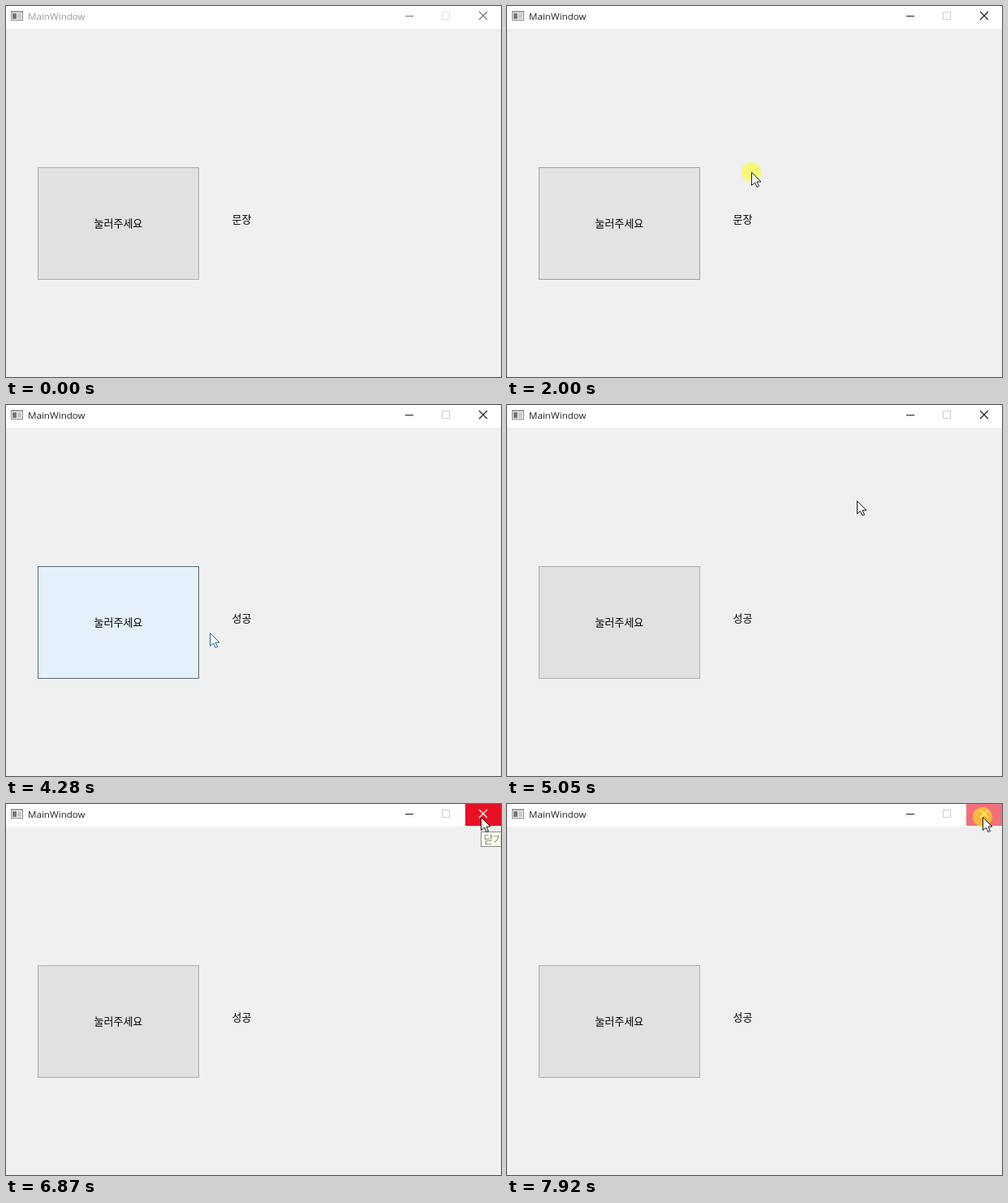
An HTML page with a canvas that plays this animation: 610x458 px, repeating every 8000 ms.

```html
<!DOCTYPE html>
<html lang="ko">
<head>
<meta charset="utf-8">
<style>
  html, body { margin: 0; width: 100%; height: 100%; overflow: hidden; background: #f0f0f0; }
  canvas { display: block; }
</style>
</head>
<body>
<canvas id="stage" width="610" height="458"></canvas>
<script>
const ctx = document.getElementById('stage').getContext('2d');
const LOOP = 8000, TICK = 70, CLICK = 200;
const KOREAN = '13px "Noto Sans CJK KR", "Noto Sans CJK", sans-serif';
const LATIN = '11.6px "Open Sans", "Noto Sans", sans-serif';

const button = { x: 39, y: 199, w: 199, h: 139 };
const closeBox = { x: 566, y: 0, w: 44, h: 27 };

const activateAt = 1930, pressAt = 3850, closeAt = 7920;
const isClick = (t, at) => t >= at && t < at + CLICK;

// Pointer strokes: each is one eased Bezier curve
const strokes = [
  { start: 550, end: 1390, curve: [[597, 411], [350, -111], [180, 370], [142, 271]] },
  { start: 1580, end: 1930, curve: [[142, 271], [301, 205]] },
  { start: 2220, end: 3050, curve: [[301, 205], [290, -77], [170, 60], [83, 263]] },
  { start: 4060, end: 4630, curve: [[83, 263], [300, 290], [400, 290], [300, 290]] },
  { start: 4630, end: 5400, curve: [[300, 290], [90, 290], [648, -2], [585, 16]] },
  { start: 6870, end: 7780, curve: [[585, 16], [148, 250], [148, 366], [586, 16]] }
];

const lerp = (a, b, u) => a + (b - a) * u;
const smooth = u => u * u * (3 - 2 * u);

function bezier(points, u) {
  if (points.length === 1) return points[0];
  const inner = points.slice(1).map((p, i) => p.map((v, axis) => lerp(points[i][axis], v, u)));
  return bezier(inner, u);
}

function pointerAt(t) {
  const stroke = strokes.findLast(s => s.start <= t);
  if (!stroke) return null;
  const { start, end, curve } = stroke;
  const ticks = Math.round((end - start) / TICK);
  const tick = Math.floor(ticks * (t - start) / (end - start) + 1e-6);
  return bezier(curve, smooth(Math.min(1, tick / ticks))).map(Math.round);
}

function isOver(box, t) {
  const p = pointerAt(t);
  return p && p[0] >= box.x && p[0] < box.x + box.w && p[1] >= box.y && p[1] < box.y + box.h;
}

// Hover fades linearly: the share of recent time spent over the box
function hoverLevel(box, t, fade) {
  const samples = 20;
  let hits = 0;
  for (let i = 0; i < samples; i++) hits += isOver(box, t - fade * i / samples) ? 1 : 0;
  return hits / samples;
}

function mix(a, b, u) {
  return `rgb(${a.map((v, i) => Math.round(lerp(v, b[i], u))).join()})`;
}

function rect(color, x, y, w, h) {
  ctx.fillStyle = color;
  ctx.fillRect(x, y, w, h);
}

function frame(color, x, y, w, h) {
  ctx.strokeStyle = color;
  ctx.strokeRect(x + .5, y + .5, w - 1, h - 1);
}

function text(string, x, y, font, color) {
  ctx.font = font;
  ctx.fillStyle = color;
  ctx.fillText(string, x, y);
}

function drawIcon() {
  rect('#f4f4f4', 6, 6, 15, 12);
  frame('#8c8c8c', 6, 6, 15, 12);
  rect('#a0a0a0', 7, 6, 13, 2);
  rect('#777', 8, 9, 5, 7);
  rect('#c4ccd4', 14, 9, 5, 7);
}

function drawTitleBar(t) {
  const active = t >= activateAt;
  const closing = isClick(t, closeAt);
  const red = closing ? 1 : hoverLevel(closeBox, t - 130, 140);
  const ink = active ? 30 : 120;

  rect('#fff', 0, 0, 610, 28);
  drawIcon();
  text('MainWindow', 27, 17, LATIN, active ? '#222' : '#999');
  rect(mix([ink, ink, ink], [255, 255, 255], 0), 492, 12, 10, 1);
  frame(active ? '#ccc' : '#e2e2e2', 537, 7, 10, 10);

  const { x, y, w, h } = closeBox;
  rect(mix([255, 255, 255], closing ? [241, 112, 122] : [232, 17, 35], red), x, y, w, h);
  ctx.strokeStyle = mix([ink, ink, ink], [255, 255, 255], red);
  ctx.lineWidth = 1.2;
  ctx.beginPath();
  ctx.moveTo(583, 7); ctx.lineTo(593, 17);
  ctx.moveTo(593, 7); ctx.lineTo(583, 17);
  ctx.stroke();
  ctx.lineWidth = 1;
}

function drawButton(t, hover) {
  const { x, y, w, h } = button;
  const pressed = isClick(t, pressAt);
  rect(pressed ? '#cce4f7' : mix([225, 225, 225], [229, 241, 251], hover), x, y, w, h);
  frame(pressed ? '#005499' : mix([173, 173, 173], [80, 102, 122], hover), x, y, w, h);
  text('눌러주세요', 108.5, 273, KOREAN, '#000');
}

function drawTooltip(t) {
  if (t < 6870 || t >= 6870 + 2 * TICK) return;
  rect('#fffff0', 585, 34, 40, 19);
  frame('#888', 585, 34, 40, 19);
  text('닫기', 588.5, 48, KOREAN, '#888870');
}

function drawPointer(t, hover) {
  const pointer = pointerAt(t);
  if (!pointer) return;
  ctx.save();
  ctx.translate(...pointer);
  if ([activateAt, pressAt, closeAt].some(at => isClick(t, at))) {
    ctx.fillStyle = 'rgba(255,255,0,.5)';
    ctx.beginPath();
    ctx.arc(0, 0, 12, 0, 2 * Math.PI);
    ctx.fill();
  }
  const arrow = new Path2D('M.5 .5V16.5L4.5 13L7 18.5L9.5 17.5L7 12H12Z');
  ctx.fillStyle = '#fff';
  ctx.strokeStyle = mix([20, 20, 20], [31, 102, 160], hover);
  ctx.fill(arrow);
  ctx.stroke(arrow);
  ctx.restore();
}

function draw(now) {
  const t = now % LOOP;
  const hover = hoverLevel(button, t, 250);
  rect('#f0f0f0', 0, 0, 610, 458);
  drawTitleBar(t);
  drawButton(t, hover);
  text(t < pressAt + CLICK ? '문장' : '성공', 278.5, 268, KOREAN, '#000');
  drawTooltip(t);
  drawPointer(t, hover);
  requestAnimationFrame(draw);
}
requestAnimationFrame(draw);
</script>
</body>
</html>
```
